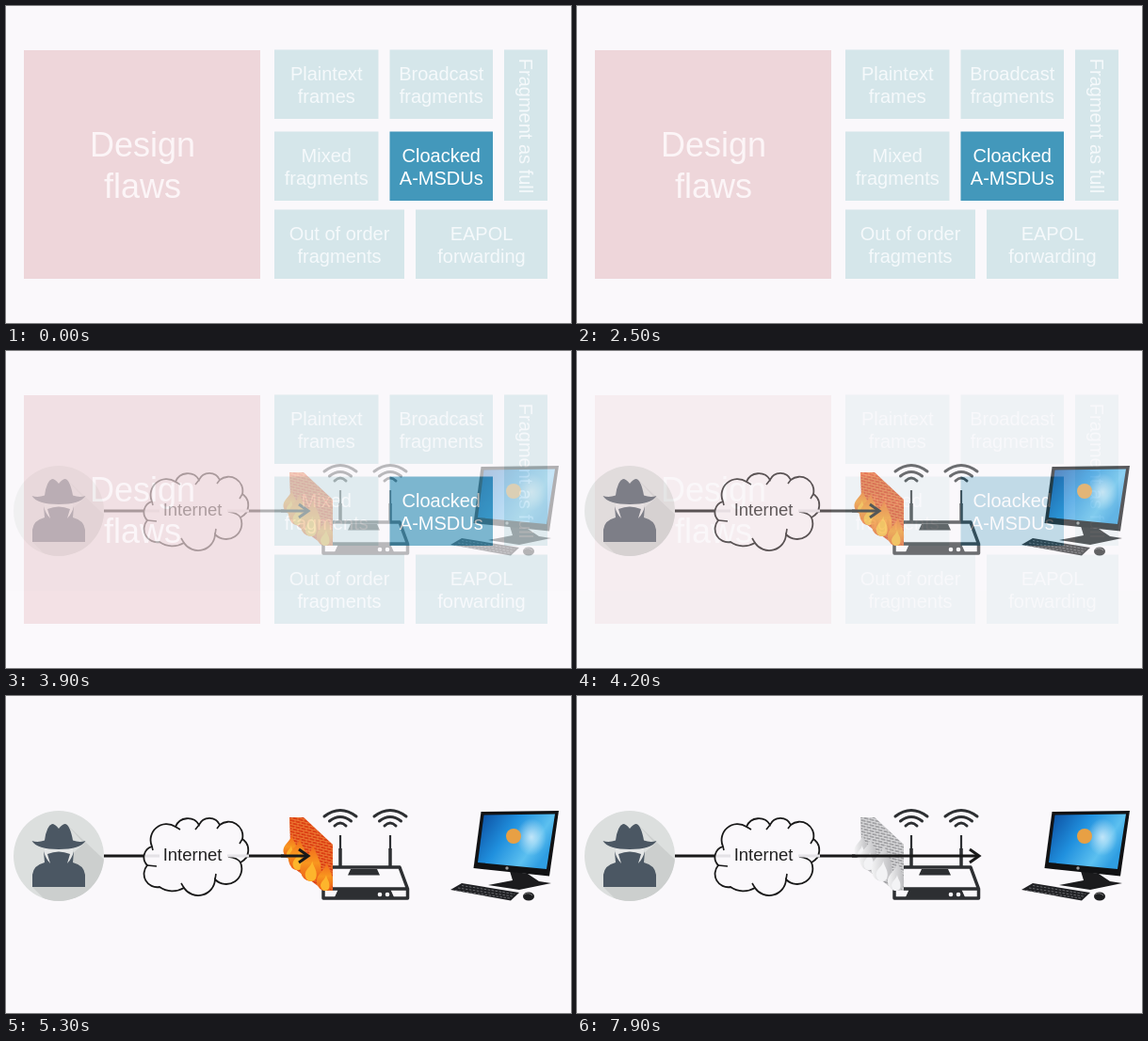
Write an HTML page that moves like this. It is 600 px wide and 337 px high and loops after 8000 ms.

```html
<!DOCTYPE html>
<html lang="en">
<head>
<meta charset="utf-8">
<title>Fragment attack overview</title>
<style>
html, body { margin: 0; width: 100%; height: 100%; overflow: hidden; background: #faf8fb; }
svg { display: block; width: 100vw; height: 100vh; }
text { font-family: "Liberation Sans", Arial, sans-serif; text-anchor: middle; }
.line { fill: none; stroke: #191919; stroke-width: 3; }
.gear { fill: none; stroke: #2d2f32; stroke-width: 3.5; stroke-linejoin: round; }
.wifi { stroke-width: 3; stroke-linecap: round; }
</style>
</head>
<body>
<svg viewBox="0 0 600 337">
  <defs>
    <linearGradient id="screen" x1="0" y1="0" x2="1" y2=".5">
      <stop offset="0" stop-color="#0b4a9c"/>
      <stop offset=".45" stop-color="#2090de"/>
      <stop offset=".8" stop-color="#5cc0f0"/>
      <stop offset="1" stop-color="#2f9ee2"/>
    </linearGradient>
    <radialGradient id="glow">
      <stop offset="0" stop-color="#fff" stop-opacity=".65"/>
      <stop offset="1" stop-color="#fff" stop-opacity="0"/>
    </radialGradient>
    <linearGradient id="fire" x1="0" y1="0" x2="0" y2="1">
      <stop offset="0" stop-color="#f0661c"/>
      <stop offset=".5" stop-color="#f8961f"/>
      <stop offset="1" stop-color="#ec5a18"/>
    </linearGradient>
    <linearGradient id="ash">
      <stop offset="0" stop-color="#f4f4f5"/>
      <stop offset="1" stop-color="#bdbdc0"/>
    </linearGradient>
    <clipPath id="disc"><circle cx="56" cy="170" r="48"/></clipPath>
    <clipPath id="brickClip"><path d="M301 129H316L347 158V207H338L322 195 303 181Z"/></clipPath>
  </defs>

  <g id="tiles"></g>

  <g id="diagram">
    <path d="M0 0H600V337H0Z" fill="#faf8fb"/>

    <!-- hooded visitor -->
    <circle cx="56" cy="170" r="48" fill="#dcdfde"/>
    <path d="M64 136L115 184V235H60L28 203 83 157Z" fill="#cccfce" clip-path="url(#disc)"/>
    <path d="M41 160H71V172L62 184H50L41 172Z" fill="#e4e6e6"/>
    <path d="M27.500 154Q34 156 41 153.500Q43 138 49 136Q52 136 56 141Q60 136 63 136Q68 137 71 153.500Q78 156 84.500 154Q79 163 56 163T27.500 154Z
      M28 203V190Q29 180 41 177L40 165Q42 173 47 178L44 168Q56 163 68 168L65 178Q70 173 72 165L71 177Q83 180 84 190V203Z" fill="#4b5763"/>

    <!-- network -->
    <path class="line" d="M104 170H148M256 170H320"/>
    <path class="line" style="stroke-width:1.800;fill:#faf8fb" d="M155 160A17 17 0 0 1 180 139A14 14 0 0 1 205 137A12 12 0 0 1 227 137A15 15 0 0 1 251 152A14.500 14.500 0 0 1 249 177A16.500 16.500 0 0 1 222 195A18 18 0 0 1 189 204A24 24 0 0 1 163 203A14 14 0 0 1 150 180A12 12 0 0 1 155 160Z"/>
    <path class="line" style="stroke-width:1.600" d="M180 139l5 3M205 137l-4 5M227 137l-3 4M251 152l-3 5M249 177q-3-5-13-6M222 195l1-6M189 204l-3-5M150 180l10 1M155 160l1 4"/>
    <path d="M148 170H163M235 170H258" stroke="#e4e2e6" stroke-width="3"/>
    <text x="198" y="175" font-size="18.500" fill="#222">Internet</text>

    <!-- router -->
    <g class="gear">
      <path d="M337 205L346 182H418L426.500 205V215H337ZH426"/>
      <path d="M355 148V164M408 148V164" stroke-width="2.200"/>
      <path d="M355 162V181M408 162V181"/>
      <path id="waves" class="wifi" d="M338 128Q355 115 372 128M343.500 133Q355 124 366.500 133M349 138Q355 132 361 138"/>
      <use href="#waves" x="53"/>
    </g>
    <path d="M366 184H394L397 190.500H363ZM353 205H408L413 216H348Z" fill="#2d2f32"/>
    <g fill="#faf8fb"><circle cx="397" cy="211" r="2.300"/><circle cx="405" cy="211" r="2.300"/></g>

    <!-- workstation -->
    <path d="M535 186L554 189 566 197 579 199 545 206 512 201 538 196Z" fill="#1b1b1d"/>
    <path d="M504.500 123L587 122 577 191.500 496.500 183Z" fill="#111214"/>
    <path d="M507.500 126.500L583 125.500 574 184 501 177Z" fill="url(#screen)"/>
    <ellipse cx="558" cy="150" rx="16" ry="20" fill="url(#glow)"/>
    <circle cx="539" cy="149" r="8" fill="#e8a044"/>
    <circle cx="532" cy="183" r="1.700" fill="#999"/>
    <path d="M472 206L484 199 545 209 536 217.500Z" fill="#202124"/>
    <path d="M484 201.500L540 210.500M480 204L538 213M477 206.500L535 215" stroke="#66676b" stroke-width="1" stroke-dasharray="2.500 1.500"/>
    <ellipse cx="555" cy="213" rx="6" ry="4.500" fill="#1d1e20"/>
    <path d="M550 211Q555 208 559 212" fill="none" stroke="#777"/>

    <g id="closed"></g>
    <g id="open"></g>
  </g>
</svg>
<script>
const $ = id => document.getElementById(id);

const label = (x, y, size, gap, color, lines) => lines.map((s, i) =>
  `<text x="${x}" y="${y + i * gap}" font-size="${size}" fill="${color}">${s}</text>`).join('');

const tile = (x, y, w, h, lines, fill = '#d5e6ea', color = '#f5f9fb') =>
  `<rect x="${x}" y="${y}" width="${w}" height="${h}" fill="${fill}"/>` +
  label(x + w / 2, y + 32.5, 20, 24, color, lines);

$('tiles').innerHTML =
  tile(19, 47, 251, 243, [], '#eed6da') +
  label(145, 160, 36, 43.5, '#fcf5f7', ['Design', 'flaws']) +
  tile(285, 46.5, 110.5, 73.5, ['Plaintext', 'frames']) +
  tile(407.5, 46.5, 109.5, 73.5, ['Broadcast', 'fragments']) +
  tile(529, 46.5, 46, 160.5, []) +
  '<g transform="translate(545 127.5) rotate(90)">' + label(0, 0, 20, 0, '#f5f9fb', ['Fragment as full']) + '</g>' +
  tile(285, 133.5, 110.5, 73.5, ['Mixed', 'fragments']) +
  tile(407.5, 133.5, 109.5, 73.5, ['Cloacked', 'A-MSDUs'], '#4398bb', '#fff') +
  tile(285, 216.5, 138, 73.5, ['Out of order', 'fragments']) +
  tile(435, 216.5, 140, 73.5, ['EAPOL', 'forwarding']);

// One tongue of fire standing on (x, y), with a brighter core
const tongue = (x, y, size, flame, core) => [[size, flame], [size * .55, core]].map(([k, fill]) =>
  `<path transform="translate(${x} ${y}) scale(${k})" fill="${fill}"
    d="M2 -34C4 -24 10 -20 9 -9Q8 0 0 0T-10 -10C-11 -20 0 -24 2 -34Z"/>`).join('');

// Brick wall in perspective with flames in front
function wall(brick, mortar, flame, core) {
  let joints = '';
  for (let i = 0; i < 34; i++) {
    const y = 112 + i * 3;
    joints += `M300 ${y}l50 12`;
    for (let x = 301 + i % 2 * 3; x < 350; x += 6) joints += `M${x} ${y + (x - 300) * .24}v3`;
  }
  return `<g clip-path="url(#brickClip)"><path d="M290 120H350V210H290Z" fill="${brick}"/>
    <path d="${joints}" fill="none" stroke="${mortar}" stroke-width=".8"/></g>` +
    tongue(302, 173, .75, flame, core) +
    tongue(310, 185, 1, flame, core) +
    tongue(324, 197, 1.15, flame, core) +
    tongue(339, 207, .9, flame, core);
}
const head = x => `<path class="line" d="M${x - 10} 163L${x} 170 ${x - 10} 177"/>`;

$('closed').innerHTML = wall('#dc3f14', '#f08a3c', 'url(#fire)', '#fdb52c') +
  '<path class="line" d="M292 170H320"/>' + head(321);
$('open').innerHTML = wall('#a2a2a5', '#ececee', 'url(#ash)', '#f3f3f5') +
  '<path class="line" d="M292 170H426"/>' + head(427);

const ramp = (t, from, length) => Math.min(1, Math.max(0, (t - from) / length));

function draw(now) {
  const t = now % 8000;
  const opened = ramp(t, 5500, 700);
  $('diagram').style.opacity = ramp(t, 3650, 800);
  $('closed').style.opacity = 1 - opened;
  $('open').style.opacity = opened;
  requestAnimationFrame(draw);
}
draw(performance.now());
</script>
</body>
</html>
```
